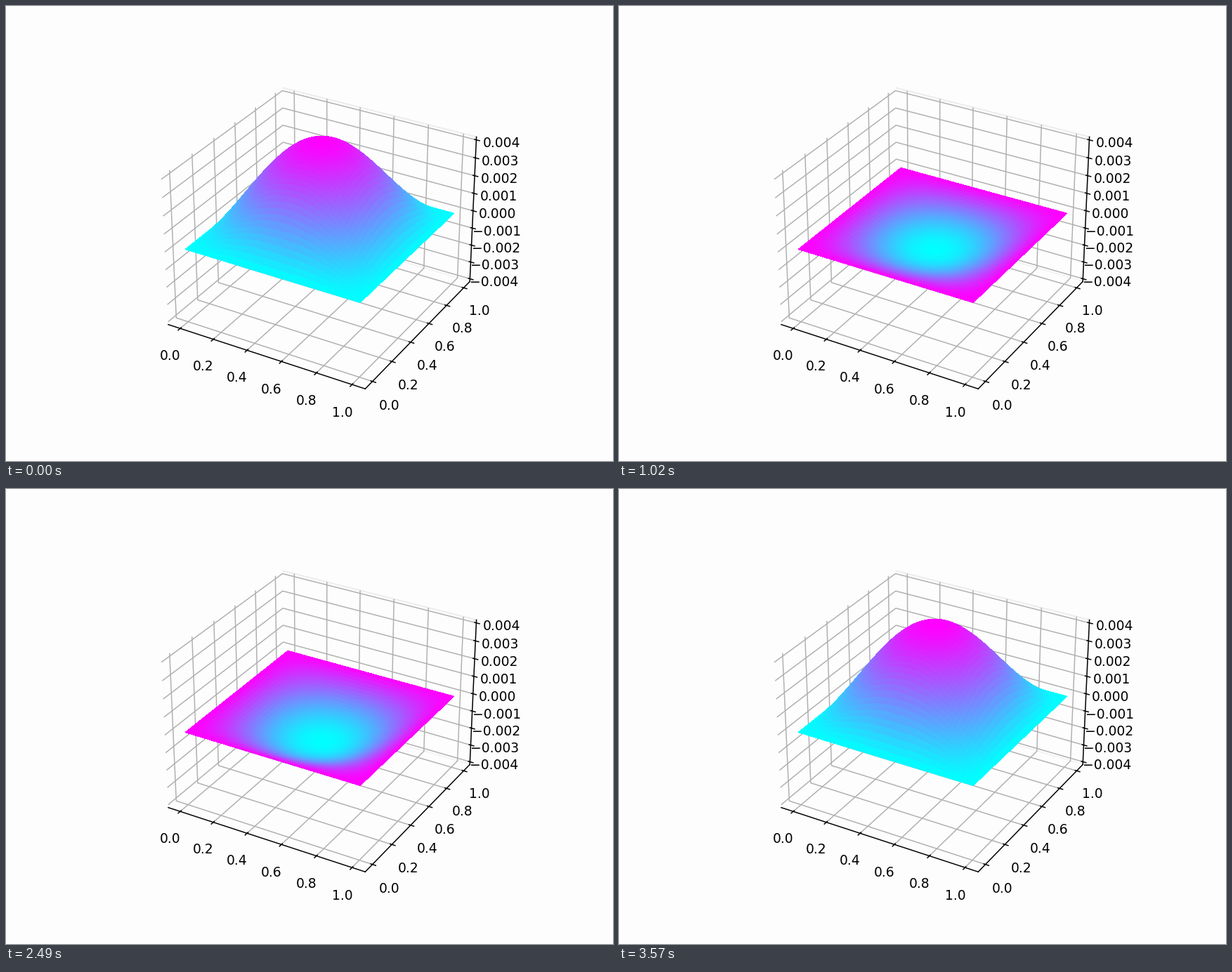
Animation, 864 px wide and 648 px high, one loop 3600 ms. Source, as a matplotlib script:

```python
import numpy as np
import matplotlib.pyplot as plt
from matplotlib.animation import FuncAnimation
from mpl_toolkits.mplot3d.art3d import Poly3DCollection

FRAMES = 120
INTERVAL = 30
CELLS = 50
PEAK = 0.005
PAPER = "#fdfdfd"

axis_pts = np.linspace(0, 1, CELLS + 1)
X, Y = np.meshgrid(axis_pts, axis_pts)
MODE = PEAK * np.sin(np.pi * X) * np.sin(np.pi * Y)


def corners(grid):
    """Four corner values of every cell, one row per cell."""
    quad = (grid[:-1, :-1], grid[:-1, 1:], grid[1:, 1:], grid[1:, :-1])
    return np.stack([q.ravel() for q in quad], axis=1)


def padded(low, high):
    """Limits widened by the small gap between data range and box."""
    gap = (high - low) / 48
    return low - gap, high + gap


XC, YC, ZC = corners(X), corners(Y), corners(MODE)

fig = plt.figure(figsize=(6.4, 4.8), dpi=135, facecolor=PAPER)
ax = fig.add_subplot(projection="3d", facecolor=PAPER)
ax.view_init(elev=30, azim=-60)
ax.set_xlim(padded(-0.05, 1.05))
ax.set_ylim(padded(-0.05, 1.05))
ax.set_zlim(padded(-0.004, 0.004))

for axis, edge in ((ax.xaxis, "none"), (ax.yaxis, "#ececec"), (ax.zaxis, "none")):
    axis.pane.set_alpha(None)
    axis.pane.set_facecolor(PAPER)
    axis.pane.set_edgecolor(edge)

membrane = Poly3DCollection(np.stack([XC, YC, ZC], axis=2),
                            cmap="cool", linewidth=0, antialiased=False)
ax.add_collection3d(membrane)


def update(i):
    # The last frame closes the full oscillation.
    z = ZC * np.cos(2 * np.pi * i / (FRAMES - 1))
    membrane.set_verts(np.stack([XC, YC, z], axis=2))
    height = z.mean(axis=1)
    membrane.set_array(height)
    membrane.set_clim(height.min(), height.max())
    return (membrane,)


anim = FuncAnimation(fig, update, frames=FRAMES, interval=INTERVAL,
                     init_func=lambda: update(0), repeat=True, repeat_delay=0)
plt.show()
```
